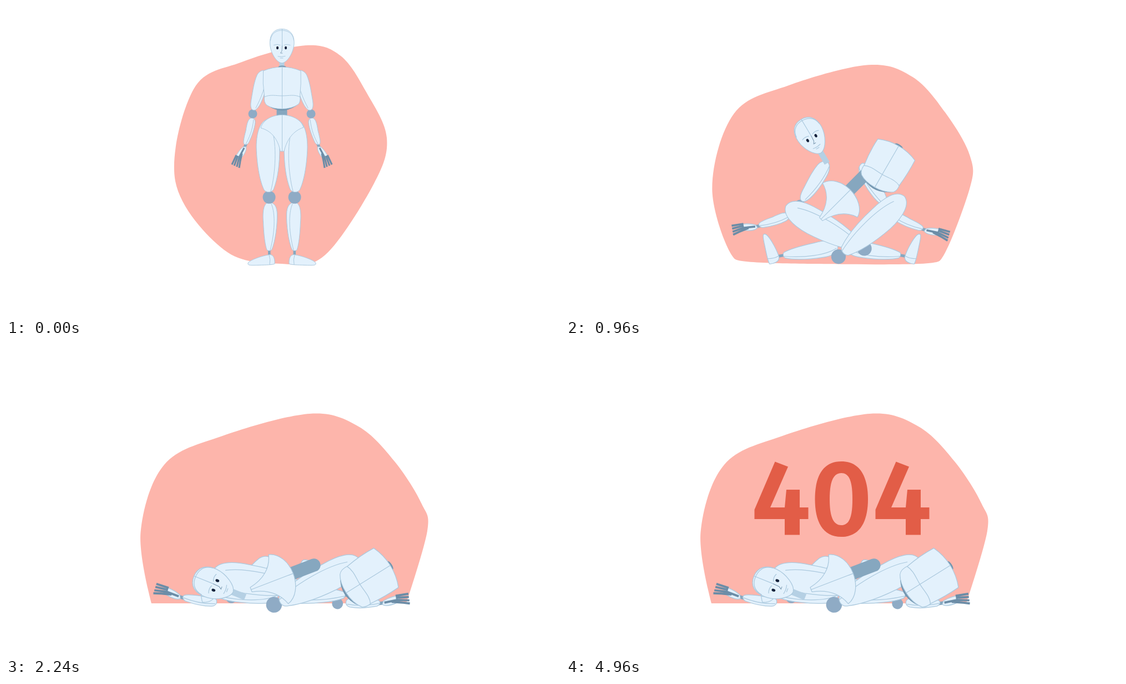
Write an HTML page that moves like this. It is 998 px wide and 561 px high and loops after 5.04 s.

```html
<!DOCTYPE html>
<html lang="en">
<head>
<meta charset="utf-8">
<title>404</title>
<style>
  html, body { margin: 0; width: 100%; height: 100%; overflow: hidden; background: #fff; }
  svg { display: block; width: 998px; height: 561px; }
  .skin { fill: #e3f1fc; stroke: #abc9de; stroke-width: 1; stroke-linejoin: round; }
  .line { fill: none; stroke: #abc9de; stroke-width: 1; stroke-linecap: round; }
  .face { fill: none; stroke: #7d9bb3; stroke-width: .9; stroke-linecap: round; }
  .joint { fill: #8fabc5; }
  .metal { fill: #86a7bf; }
  .shade { fill: #7396b0; }
  .neck { fill: #b5d0e4; }
  .eye { fill: #12203a; }
  .finger { fill: none; stroke: #6c8da7; stroke-width: 3.2; }
</style>
</head>
<body>
<svg viewBox="0 0 998 561" xmlns="http://www.w3.org/2000/svg">
  <path id="blob" fill="#fdb5ab"/>
  <g id="digits" fill="#e25d47" role="img" aria-label="404">
    <path id="four" d="M376.500 210.500L400 219.500L368 293H394L397 261H421V293H436.500V314H421V342.500H394V314H339.500V297Z"/>
    <path fill-rule="evenodd" d="M496 210C530 210 544 238 544 278S530 346 496 346S448.500 318 448.500 278S462 210 496 210ZM496 231C480 231 475 250 475 278S480 325 496 325S516 306 516 278S512 231 496 231Z"/>
    <use href="#four" x="218"/>
  </g>
  <g id="robot"></g>
</svg>
<script>
const LOOP = 5040, STEP = 80;
const FALL = 400, RAMP = 220;   // start of the fall, length of its soft ends
const MIRROR = 994, GROWTH = .24;
const NS = 'http://www.w3.org/2000/svg';
const $ = id => document.getElementById(id);

const clamp = v => Math.min(1, Math.max(0, v));
const mix = (a, b, k) => a + (b - a) * k;
const smooth = (t, a, b) => {
  const p = clamp((t - a) / (b - a));
  return p * p * (3 - 2 * p);
};

// Speeds up, coasts at an even pace, slows down.
function coast(t, span) {
  const speed = 1 / (span - RAMP), u = t - FALL;
  const ramp = v => speed * v * v / (2 * RAMP);
  if (u <= 0) return 0;
  if (u >= span) return 1;
  if (u < RAMP) return ramp(u);
  if (u > span - RAMP) return 1 - ramp(span - u);
  return speed * (u - RAMP / 2);
}

const circle = (x, y, rx, ry = rx) =>
  `M${x - rx} ${y}a${rx} ${ry} 0 1 0 ${2 * rx} 0a${rx} ${ry} 0 1 0 ${-2 * rx} 0Z`;

// Four fingers fan out across the palm.
const fingers = [-1, -.35, .35, 1].map(i =>
  `M${419 + 4 * i} ${271 + 2 * i}L${413.5 + 6.5 * i} ${289 + 3 * i}`).join('') + 'M425 266L421.500 282';

// Every shape is drawn in the standing pose; right limbs mirror the left ones.
const ART = {
  forearm: [
    ['metal', 'M430.500 247L435 249L431.500 257L427 255Z'],
    ['skin', 'M432.500 254C434 259 430 267 424 274L414 276C413 271 419 261 427 254Z'],
    ['finger', 'M429 256L420 273' + fingers],
    ['skin', 'M442 202C436 203 434 212 432 225C428 240 427 247 429 249C431 251 435 250 437 247C443 235 448 220 449 210C449 204 446 202 442 202Z'],
    ['line', 'M446 205C444 225 438 238 432 249']
  ],
  arm: [
    ['joint', circle(444.5, 194.5, 8)],
    ['skin', 'M463 116C472 118 473 130 470 142C465 165 455 188 447 188C440 188 440 178 442 168C445 150 447 137 452 125C455 119 459 117 463 116Z'],
    ['line', 'M470 121C468 145 460 165 450 184']
  ],
  shin: [
    ['metal', 'M472 438H476.500V451H472Z'],
    ['skin', 'M436 464C437 459 460 451 472 449C480 447 483 452 484 460V465C480 467 470 467 455 467.500C440 468 435 468 436 464Z'],
    ['line', 'M474 449Q477 457 475 466.500'],
    ['skin', 'M474 354C464 355 462 370 463.500 390C464.500 415 467 432 470 440C472 442 477 442 479 439C485 425 489 395 488.500 375C488 362 484 355 474 354Z'],
    ['line', 'M478 357C486 375 484 410 476 440']
  ],
  thigh: [
    ['joint', circle(474, 345, 11.5)],
    ['skin', 'M473 204C459 206 451 225 451 255C452 290 458 318 465 332C469 337 478 337 482 331C490 310 493 285 493 255C494 230 490 206 473 204Z'],
    ['line', 'M479 222C488 250 486 300 477 334']
  ],
  pelvis: [
    ['metal', 'M487.500 200V164A9.500 9.500 0 0 1 506.500 164V200Z'],
    ['skin', 'M459 220C463 205 480 196.500 497 196.500C515 196.500 532 205 536 219C518 225 506 240 501 262H494C490 240 478 225 459 220Z'],
    ['line', 'M497.500 197V262']
  ],
  neck: [['neck', 'M492.500 98H501.500V122H492.500Z']],
  chest: [
    ['shade', circle(497.5, 110, 7, 2.5)],
    ['shade', 'M472 180Q497 197 523 180Z'],
    ['skin', 'M463.500 117Q480 110 497 110Q515 110 531 117Q532 140 529.500 163Q531 172 527 177Q515 185.500 497 185.500Q480 185.500 470 179Q464 174 465.500 163Q462 140 463.500 117Z'],
    ['line', 'M497.500 110V185M465.500 164C476 159 487 162 497 162C510 162 520 159 529.500 164']
  ],
  head: [
    ['skin', 'M497 41.500C512 41.500 519.500 52 519 68C518 84 507 102 497 103C487 102 476 84 475.500 68C475 52 482 41.500 497 41.500Z'],
    ['line', 'M497.500 42V72M476.500 62C478 48 488 44 497 44S517 48 518.500 62M482.500 70.500Q488 68 494 70.500M501 70.500Q506 68 512 70.500'],
    ['face', 'M497.500 72L497 81L494.500 85H498'],
    ['line', 'M490 91Q496 92.500 503 90.500M494 94H499'],
    ['eye', circle(489, 75.5, 2, 2.8) + circle(504, 75.5, 2, 2.8)]
  ]
};

function add(parent, tag, attrs = {}) {
  const el = document.createElementNS(NS, tag);
  for (const k in attrs) el.setAttribute(k, attrs[k]);
  return parent.appendChild(el);
}

// A part travels from its pivot to the place and angle where it comes to lie.
const parts = [];
function part(name, span, [px, py], [x, y, angle], flip = false) {
  const el = add($('robot'), 'g');
  const inner = flip ? add(el, 'g', { transform: `matrix(-1 0 0 1 ${MIRROR} 0)` }) : el;
  for (const [cls, d] of ART[name]) add(inner, 'path', { class: cls, d });
  parts.push({ el, span, px: flip ? MIRROR - px : px, py, x, y, angle });
}

function pair(name, span, pivot, left, right = [MIRROR - left[0], left[1], -left[2]]) {
  part(name, span, pivot, left);
  part(name, span, pivot, right, true);
}

pair('forearm', 890, [443, 205], [376, 463, 83], [616, 464, -74]);
pair('arm', 950, [466, 120], [474, 388, 29], [534, 394, -25]);
pair('shin', 700, [474, 447], [376, 451, 88]);
pair('thigh', 810, [472, 208], [377, 412, -80], [634, 391, 62]);
part('pelvis', 910, [497, 229], [479.5, 426, 69]);
part('neck', 1215, [497, 72], [373.5, 431.5, -68]);
part('chest', 1090, [497, 148], [652, 422, 58]);
part('head', 1215, [497, 72], [373.5, 431.5, -68]);

// Outline points clockwise from the bottom left: standing x, y, then lying x, y.
const BLOB = [
  [393, 440, 262, 466], [305, 316, 242.5, 338], [338, 150, 285, 216], [425, 101, 390, 164],
  [540, 71, 547, 124], [603, 90, 635, 147], [650, 157, 700, 210], [686, 238, 748, 285],
  [663, 320, 759, 335], [575, 449, 721, 466], [497, 465, 497, 466]
];
const CORNERS = [0, 9];

function blobPath(k) {
  const n = BLOB.length;
  const pts = BLOB.map(([a, b, c, d]) => [mix(a, c, k), mix(b, d, k)]);
  const handle = (i, side) => {
    const prev = pts[(i + n - 1) % n], next = pts[(i + 1) % n];
    const pull = side / 6 * (CORNERS.includes(i) ? 1 - k : 1);
    return pts[i].map((v, a) => v + (next[a] - prev[a]) * pull);
  };
  return `M${pts[0]}` + pts.map((_, i) => {
    const j = (i + 1) % n;
    return `C${handle(i, 1)} ${handle(j, -1)} ${pts[j]}`;
  }).join('') + 'Z';
}

function draw(t) {
  $('blob').setAttribute('d', blobPath(smooth(t, 580, 1200)));
  $('digits').setAttribute('opacity', smooth(t, 2880, 3280));
  const scale = 1 + GROWTH * coast(t, 980);
  for (const { el, span, px, py, x, y, angle } of parts) {
    const k = coast(t, span);
    el.setAttribute('transform', `translate(${mix(px, x, k)} ${mix(py, y, k)}) ` +
      `rotate(${angle * k}) scale(${scale}) translate(${-px} ${-py})`);
  }
}

const start = performance.now();
function tick() {
  const t = (performance.now() - start) % LOOP;
  draw(Math.floor(t / STEP) * STEP);
  requestAnimationFrame(tick);
}
tick();
</script>
</body>
</html>
```
